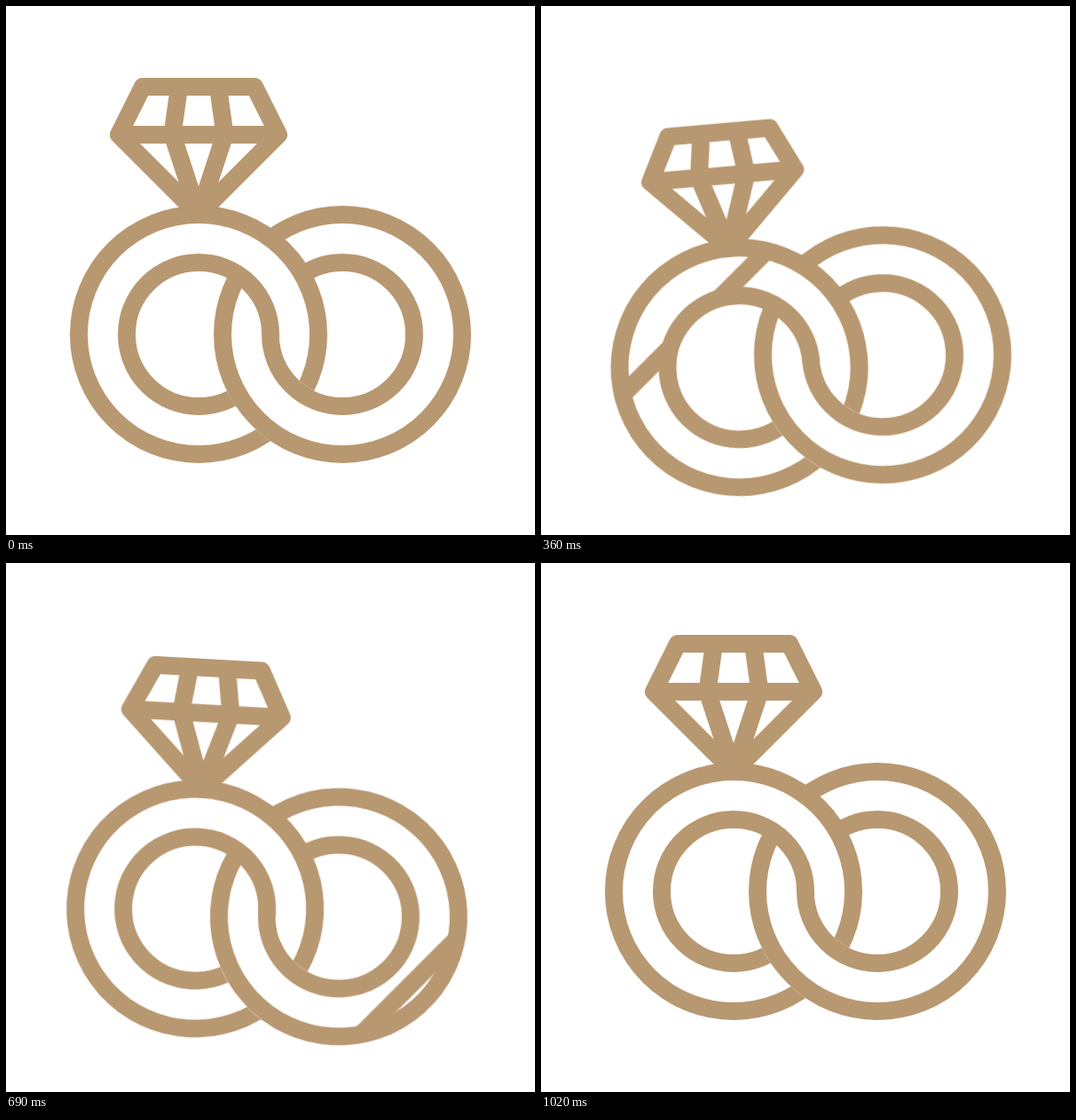
Animation, 596 px wide and 596 px high, one loop 1.08 s. Source, as an HTML page:

```html
<!DOCTYPE html>
<html lang="en">
<head>
<meta charset="utf-8">
<title>Wedding rings</title>
<style>
  html, body { margin: 0; height: 100%; overflow: hidden; background: #fff; }
  svg { display: block; width: 100%; height: 100%; }

  .drop, .tilt, .level, .gem, .shine {
    animation: 1080ms cubic-bezier(.5, 0, .5, 1) infinite both;
  }
  .drop { animation-name: drop; }
  .tilt { --dir: 1; animation-name: tilt; transform-origin: 298px 298px; }
  /* keeps the glints at 45 degrees while the rings tilt */
  .level { --dir: -1; animation-name: tilt; }
  .gem { animation-name: pulse; transform-origin: 217px 235px; }
  .shine { animation-name: shine; }
  .late { animation-delay: 136ms; }

  .gem path, .shine, .metal { fill: none; stroke: #b89870; stroke-width: 20; }
  .gem path { stroke-linejoin: round; vector-effect: non-scaling-stroke; }
  .metal { stroke-width: 74; }
  .band { fill: none; stroke: #fff; stroke-width: 34; }

  @keyframes drop {
    0%, 5.556% { transform: translateY(0); }
    44.444% { transform: translateY(35.5px); }
    92.6%, 100% { transform: translateY(0); }
  }
  @keyframes tilt {
    0%, 5.556% { transform: rotate(0deg); }
    33.333% { transform: rotate(calc(var(--dir) * -5deg)); }
    61.111% { transform: rotate(calc(var(--dir) * 3.2deg)); }
    94.444%, 100% { transform: rotate(0deg); }
  }
  @keyframes pulse {
    0%, 5.556% { transform: scale(1); }
    27.778% { transform: scale(.88); }
    50% { transform: scale(1.15); }
    72.222% { transform: scale(.88); }
    94.444%, 100% { transform: scale(1); }
  }
  @keyframes shine {
    0%, 15.74% { transform: translate(-102.5px, -102.5px); }
    63.89%, 100% { transform: translate(102.5px, 102.5px); }
  }
</style>
</head>
<body>
<svg viewBox="0 0 596 596">
  <defs>
    <clipPath id="ring">
      <path clip-rule="evenodd" d="M-135 0a135 135 0 1 0 270 0a135 135 0 1 0-270 0zM-81 0a81 81 0 1 0 162 0a81 81 0 1 0-162 0z"/>
    </clipPath>
    <!-- the right ring passes over the left one in its lower half -->
    <mask id="under" maskUnits="userSpaceOnUse" x="0" y="0" width="596" height="596">
      <rect width="596" height="596" fill="#fff"/>
      <path d="M271 370A108 108 0 0 0 487 370" fill="none" stroke="#000" stroke-width="74"/>
    </mask>
  </defs>

  <g class="drop"><g class="tilt">
    <g transform="translate(379 370)">
      <circle class="metal" r="108"/>
      <circle class="band" r="108"/>
      <g clip-path="url(#ring)"><g class="level">
        <path class="shine late" d="M-160 160L160-160"/>
      </g></g>
    </g>

    <g mask="url(#under)">
      <g transform="translate(217 370)">
        <circle class="metal" r="108"/>
        <circle class="band" r="108"/>
        <g clip-path="url(#ring)"><g class="level">
          <path class="shine" d="M-160 160L160-160"/>
        </g></g>
      </g>
    </g>

    <g class="gem">
      <path d="M154 91H280L307 145L217 235L127 145Z"/>
      <path d="M127 145H307"/>
      <path d="M195 91L187.5 145L217 235L246.5 145L239 91"/>
    </g>
  </g></g>
</svg>
</body>
</html>
```
